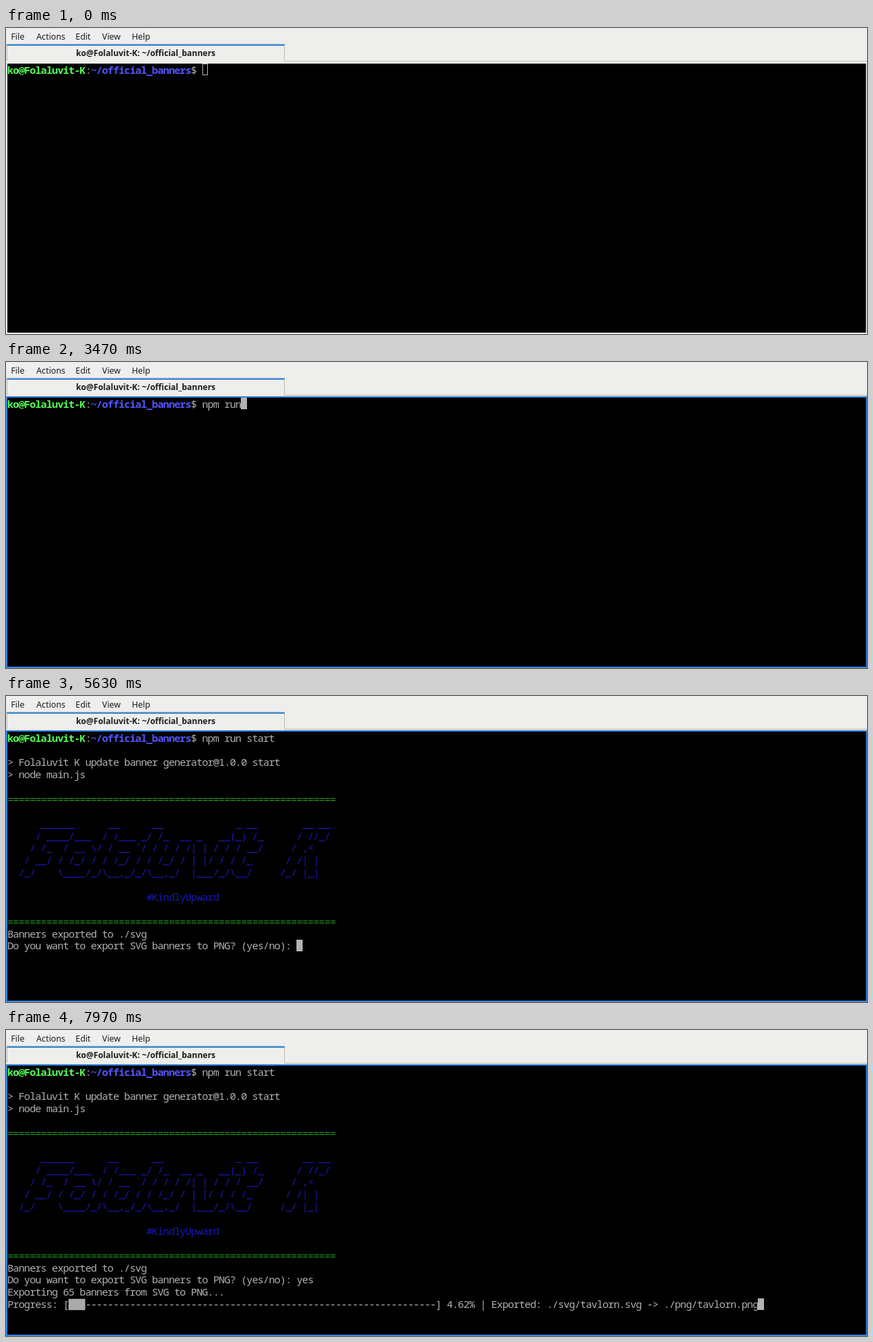
Animation of 1254 by 447 pixels, one loop 8 s. Source, as an HTML page:

```html
<!DOCTYPE html>
<html lang="en">
<head>
<meta charset="utf-8">
<title>Terminal</title>
<style>
  html, body { margin: 0; width: 100%; height: 100%; overflow: hidden; background: #eeeeec; }
  svg { display: block; width: 100%; height: 100%; }
  .ui text { font: 12.3px "Noto Sans", sans-serif; fill: #1c1c1c; }
  .ui .title { font-size: 12px; font-weight: 700; text-anchor: middle; }
  .term text { font: 15px "Noto Sans Mono", "DejaVu Sans Mono", monospace; letter-spacing: -0.9px; white-space: pre; fill: #b2b2b2; }
  .term .user { fill: #54ff54; font-weight: 700; }
  .term .path { fill: #5454ff; font-weight: 700; }
  .term .rule { fill: #20a020; }
  .term .art { fill: #1818b8; }
</style>
</head>
<body>
<svg viewBox="0 0 1254 447" xmlns="http://www.w3.org/2000/svg">
  <rect width="1254" height="447" fill="#eeeeec"/>
  <g class="ui">
    <text x="7.2" y="16.5">File</text>
    <text x="44.2" y="16.5">Actions</text>
    <text x="101.3" y="16.5">Edit</text>
    <text x="140" y="16.5">View</text>
    <text x="183.2" y="16.5">Help</text>
    <path d="M1.5 48V25M405.5 25V48.5H1254" fill="none" stroke="#bdbdb6"/>
    <rect x="1" y="23.5" width="405" height="2.5" rx="1" fill="#3f88cc"/>
    <text class="title" x="203.5" y="41">ko@Folaluvit-K: ~/official_banners</text>
  </g>
  <rect id="frame" y="50" width="1254" height="397"/>
  <rect x="2" y="52" width="1250.5" height="393"/>
  <g class="term" id="term"></g>
</svg>
<script>
const LOOP = 8000, CELL = 8.1, PITCH = 17.88;
const FOCUS = 1570, ENTER = 4370, HEADER = 5200, BANNER = 5630, EXPORT = 7000;
const PROMPT_COLS = 35, ASK_COLS = 52, BAR = 66, TOTAL = 65;

const term = document.getElementById('term');
const frame = document.getElementById('frame');
const colX = c => 2 + c * CELL;
const rowTop = r => 52 + r * PITCH;

function setAttrs(el, attrs) {
  for (const k in attrs) el.setAttribute(k, attrs[k]);
  return el;
}

function add(tag, attrs) {
  const el = document.createElementNS('http://www.w3.org/2000/svg', tag);
  return term.appendChild(setAttrs(el, attrs));
}

const timed = [];
function line(row, col, text, cls = '', at = 0) {
  const el = add('text', { x: colX(col), y: rowTop(row) + 14.5, class: cls });
  el.textContent = text;
  timed.push({ el, at });
  return el;
}

line(0, 0, 'ko@Folaluvit-K', 'user');
line(0, 14, ':');
line(0, 15, '~/official_banners', 'path');
line(0, 33, '$');

line(2, 0, '> Folaluvit K update banner generator@1.0.0 start', '', HEADER);
line(3, 0, '> node main.js', '', HEADER);

line(5, 0, '='.repeat(59), 'rule', BANNER);
[
  '      ______      __      __             _ __        __ __',
  '     / ____/___  / /___ _/ /_  __ _   __(_) /_      / //_/',
  '    / /_  / __ \\/ / __ `/ / / / /| | / / / __/     / ,<',
  '   / __/ / /_/ / / /_/ / / /_/ / | |/ / / /_      / /| |',
  '  /_/    \\____/_/\\__,_/_/\\__,_/  |___/_/\\__/     /_/ |_|'
].forEach((s, i) => line(7 + i, 0, s, 'art', BANNER));
line(13, 25, '#KindlyUpward', 'art', BANNER);
line(15, 0, '='.repeat(59), 'rule', BANNER);
line(16, 0, 'Banners exported to ./svg', '', BANNER);
line(17, 0, 'Do you want to export SVG banners to PNG? (yes/no):', '', BANNER);
line(18, 0, `Exporting ${TOTAL} banners from SVG to PNG...`, '', EXPORT);

const command = {
  text: 'npm run start',
  keys: [2700, 2900, 3010, 3120, 3230, 3340, 3450, 3560, 3670, 3770, 3900, 4030, 4170],
  el: line(0, PROMPT_COLS, '')
};
const answer = { text: 'yes', keys: [6430, 6700, 6870], el: line(17, ASK_COLS, '') };
const jobs = [
  { at: 7300, name: 'quemo' },
  { at: 7630, name: 'dorvane' },
  { at: 7960, name: 'tavlorn' }
];
const progress = line(19, 0, '');
const rest = line(19, 11, '');
const blocks = add('rect', { x: colX(11), y: rowTop(19) + 1, height: 16.5, fill: '#aaa' });
const cursor = add('rect', { stroke: '#b2b2b2' });

function type(entry, t) {
  const n = entry.keys.filter(k => t >= k).length;
  entry.el.textContent = entry.text.slice(0, n);
  return n;
}

// Draws the bar and returns the column after it.
function showProgress(t) {
  const done = jobs.filter(j => t >= j.at).length;
  blocks.setAttribute('width', done * CELL);
  progress.textContent = done ? 'Progress: [' : '';
  if (!done) {
    rest.textContent = '';
    return 0;
  }
  const { name } = jobs[done - 1];
  const pct = (100 * done / TOTAL).toFixed(2);
  const tail = '-'.repeat(BAR - done) +
    `] ${pct}% | Exported: ./svg/${name}.svg -> ./png/${name}.png`;
  rest.setAttribute('x', colX(11 + done));
  rest.textContent = tail;
  return 11 + done + tail.length;
}

function placeCursor(row, col, focused) {
  const x = Math.floor(colX(col)), y = Math.round(rowTop(row));
  setAttrs(cursor, focused
    ? { x, y, width: 9, height: 17, fill: '#b2b2b2', 'stroke-width': 0 }
    : { x: x + 1.5, y: y + 0.5, width: 7, height: 16, fill: 'none', 'stroke-width': 1 });
}

function render(t) {
  const focused = t >= FOCUS;
  frame.setAttribute('fill', focused ? '#3584dc' : '#efefe6');
  for (const { el, at } of timed) el.style.display = t >= at ? '' : 'none';

  const typed = type(command, t);
  const replied = type(answer, t);
  const end = showProgress(t);

  let row = 0, col = PROMPT_COLS + typed;
  if (t >= EXPORT) [row, col] = [19, end];
  else if (t >= BANNER) [row, col] = [17, ASK_COLS + replied];
  else if (t >= HEADER) [row, col] = [5, 0];
  else if (t >= ENTER) [row, col] = [1, 0];
  placeCursor(row, col, focused);
}

const start = performance.now();
function tick() {
  render((performance.now() - start) % LOOP);
  requestAnimationFrame(tick);
}
tick();
</script>
</body>
</html>
```
